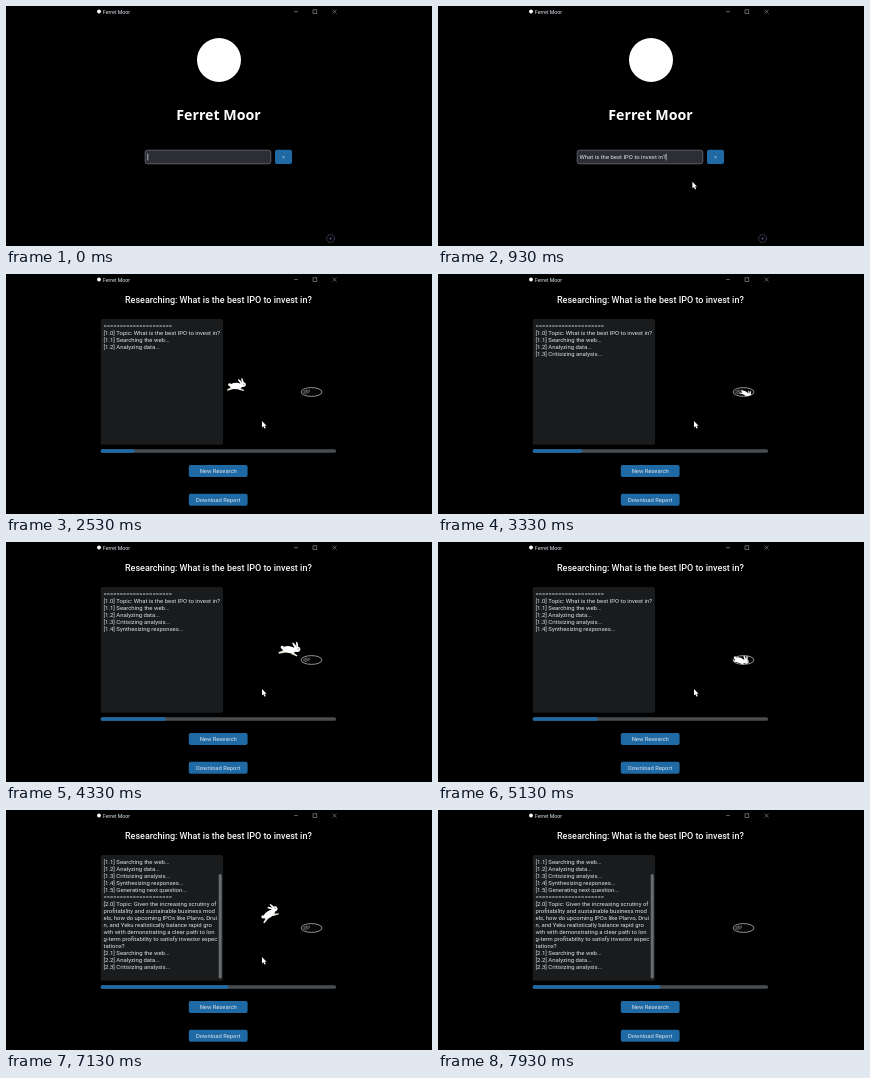
Write an HTML page that moves like this. It is 426 px wide and 240 px high and loops after 8 s.

```html
<!DOCTYPE html>
<html lang="en">
<head>
<meta charset="utf-8">
<title>Research window</title>
<style>
  html, body { margin: 0; width: 100%; height: 100%; overflow: hidden; background: #000; }
  svg { display: block; width: 100vw; height: 100vh; }
  text { font-family: Roboto, Arial, sans-serif; font-size: 5.95px; fill: #dce4ee; white-space: pre; }
  .mid { text-anchor: middle; }
  .heading { font-size: 9px; font-weight: 500; fill: #f4f6f8; }
  .brand { font: 700 14.2px "Open Sans", "Noto Sans", sans-serif; fill: #fff; }
  .bar { font-size: 5.2px; }
  .label { font-size: 5.8px; }
  .blue { fill: #1f6aa5; }
  .thin { fill: none; stroke: #a0a0a0; stroke-width: .6; }
</style>
</head>
<body>
<svg viewBox="0 0 426 240">
  <defs>
    <clipPath id="rim">
      <rect x="218" y="60" width="112" height="58"/>
      <ellipse cx="305.5" cy="118" rx="10.4" ry="4.4"/>
    </clipPath>
  </defs>
  <rect width="426" height="240"/>

  <circle cx="93" cy="5.5" r="1.9" fill="#fff"/>
  <text class="bar" x="97" y="7.6">Ferret Moor</text>
  <g class="thin">
    <path d="M288 5.6h4M326.6 3.6l4 4M330.6 3.6l-4 4"/>
    <rect x="307" y="3.8" width="3.8" height="3.8"/>
  </g>

  <g id="home">
    <circle cx="213" cy="54" r="22" fill="#fff"/>
    <text class="brand mid" x="212.5" y="114">Ferret Moor</text>
    <rect x="139.2" y="144.2" width="125.6" height="13.6" rx="2" fill="#2c2e33" stroke="#6a6e78" stroke-width=".8"/>
    <text id="query" x="141.5" y="153.2"></text>
    <path id="caret" d="M0 147.6v6.8" stroke="#e8e8e8" stroke-width=".7"/>
    <rect class="blue" x="269" y="143.8" width="17" height="14.2" rx="2"/>
    <text class="mid" x="277.5" y="153">&gt;</text>
    <g fill="none" stroke="#5c5680" stroke-width=".8">
      <circle cx="324.5" cy="232.5" r="3.9" stroke-dasharray="1.8 .65"/>
      <path d="M324.5 231.3v2.4M323.3 232.5h2.4"/>
    </g>
  </g>

  <g id="work">
    <text class="heading mid" x="212.4" y="29.4">Researching: What is the best IPO to invest in?</text>
    <rect x="94.8" y="45" width="122.2" height="125.8" rx="2" fill="#1a1b1c"/>
    <g id="log"></g>
    <rect id="thumb" x="212.7" y="64" width="3" height="104.5" rx="1.5" fill="#696d72"/>

    <ellipse cx="305.5" cy="118" rx="10.4" ry="4.4" fill="#050505" stroke="#b4b4b4" stroke-width=".8"/>
    <path d="M297 119l7-3M298.5 120l5.5-2.5M297.3 117.4l4-1.6" stroke="#8d8d8d" stroke-width=".7"/>
    <g clip-path="url(#rim)">
      <g id="bunny" fill="#fff">
        <path d="M-5 1l-6 3.4 1 1.3 8-2.6zM4 2l5.6 2.8-.6 1.2-7-2z" fill="#e9e4d8"/>
        <ellipse rx="7.4" ry="3.7"/>
        <circle cx="-7.6" cy="-1.4" r="1.7"/>
        <ellipse cx="8" cy="-1.6" rx="3.6" ry="2.9"/>
        <ellipse cx="5" cy="-5" rx="3.8" ry="1.1" transform="rotate(48 5 -5)"/>
        <ellipse cx="7.6" cy="-5.8" rx="3.6" ry="1" transform="rotate(75 7.6 -5.8)"/>
        <circle cx="9.2" cy="-2.1" r=".55" fill="#111"/>
      </g>
    </g>

    <rect x="94.8" y="175.3" width="235.2" height="3.4" rx="1.5" fill="#4a4d50"/>
    <rect id="fill" class="blue" x="94.8" y="175.3" height="3.4" rx="1.5"/>
    <rect class="blue" x="182.8" y="191" width="58.8" height="12" rx="2"/>
    <text class="label mid" x="212.2" y="199.1">New Research</text>
    <rect class="blue" x="182.8" y="219.8" width="58.8" height="12" rx="2"/>
    <text class="label mid" x="212.2" y="227.7">Download Report</text>
  </g>

  <path id="mouse" d="M0 0v6.6l1.5-1.4 1.2 2.5 1.1-.6-1.2-2.3h2z" fill="#fff"/>
</svg>
<script>
const $ = id => document.getElementById(id);
const LOOP = 8000, OPEN = 1270, SCROLL = 7000;
const QUESTION = "What is the best IPO to invest in?";
const RULE = "=".repeat(21);
const STEPS = ["Searching the web...", "Analyzing data...", "Critisizing analysis...",
  "Synthesizing responses...", "Generating next question..."];
const WIDE = "[2.0] Topic: Given the increasing scrutiny of|profitability and sustainable business model|" +
  "s, how do upcoming IPOs like Plarvo, Druin, a|nd Yeku realistically balance rapid growth w|" +
  "ith demonstrating a clear path to long-term p|rofitability to satisfy investor expectations?";
const NARROW = "[2.0] Topic: Given the increasing scrutiny of|profitability and sustainable business mod|" +
  "els, how do upcoming IPOs like Plarvo, Drui|n, and Yeku realistically balance rapid gro|" +
  "wth with demonstrating a clear path to lon|g-term profitability to satisfy investor expec|tations?";

// Start time of each research step; the sixth opens the second topic.
const STARTS = [1400, 2270, 3000, 3930, 5270, 5600, 6070, SCROLL];

// [time, run cycles], [cycle phase, x, y, angle, scale], [time, x, y]
const CYCLES = [[OPEN, 0], [1730, .3], [3330, 1.7], [4330, 2.5], [5130, 3.62], [6270, 4.76], [7930, 5.95]];
const LEAP = [[0, 230, 112, 0, .85], [.15, 239, 111, -15, .85], [.3, 250.5, 108.5, -60, .85],
  [.4, 267, 103, -25, .9], [.5, 283, 107.5, 8, .95], [.62, 302, 118.5, 20, .75],
  [.7, 307.5, 119.5, 30, .52], [.76, 306, 121, 10, .7], [.86, 307, 136, 60, .5], [1, 307, 145, 60, .5]];
const POINTER = [[850, 246, 186], [1130, 275, 150.5], [1900, 275, 150.5], [2500, 256, 147]];

function track(keys, v) {
  let i = 1;
  while (i < keys.length - 1 && v > keys[i][0]) i++;
  const a = keys[i - 1], b = keys[i];
  const k = Math.min(1, Math.max(0, (v - a[0]) / (b[0] - a[0])));
  return a.slice(1).map((n, j) => n + (b[j + 1] - n) * k);
}

function logLines(done, narrow) {
  const lines = [RULE, "[1.0] Topic: " + QUESTION];
  for (let i = 0; i < done; i++) {
    const topic = i < 5 ? 1 : 2, step = i % 5;
    if (i === 5) lines.push(RULE, ...(narrow ? NARROW : WIDE).split("|"));
    lines.push(`[${topic}.${step + 1}] ${STEPS[step]}`);
  }
  return lines.slice(-16);
}

const rows = Array.from({ length: 16 }, () => {
  const row = document.createElementNS("http://www.w3.org/2000/svg", "text");
  row.setAttribute("x", 97.5);
  return $("log").appendChild(row);
});

const show = (id, on) => $(id).setAttribute("display", on ? "inline" : "none");

function drawHome(t) {
  const count = Math.round(QUESTION.length * Math.min(1, Math.max(0, (t - 100) / 800)));
  $("query").textContent = QUESTION.slice(0, count);
  const end = count ? $("query").getComputedTextLength() : 0;
  $("caret").setAttribute("transform", `translate(${141.8 + end})`);
}

function drawWork(t) {
  const done = STARTS.filter(s => t >= s).length, narrow = t >= SCROLL;
  const lines = logLines(done, narrow);
  rows.forEach((row, i) => {
    row.textContent = lines[i] || "";
    row.setAttribute("y", 53.5 + 7 * i + (narrow ? .6 : 0));
  });
  show("thumb", narrow);
  $("fill").setAttribute("width", 2.2 + done * 235.2 / 15);
  const [x, y, angle, scale] = track(LEAP, track(CYCLES, t)[0] % 1);
  $("bunny").setAttribute("transform", `translate(${x} ${y}) rotate(${angle}) scale(${scale})`);
}

function draw(t) {
  const working = t >= OPEN;
  show("home", !working);
  show("work", working);
  working ? drawWork(t) : drawHome(t);
  show("mouse", t > 850 && t < 7200);
  $("mouse").setAttribute("transform", `translate(${track(POINTER, t)})`);
}

const begin = performance.now();
function tick() {
  draw((performance.now() - begin) % LOOP);
  requestAnimationFrame(tick);
}
tick();
</script>
</body>
</html>
```
